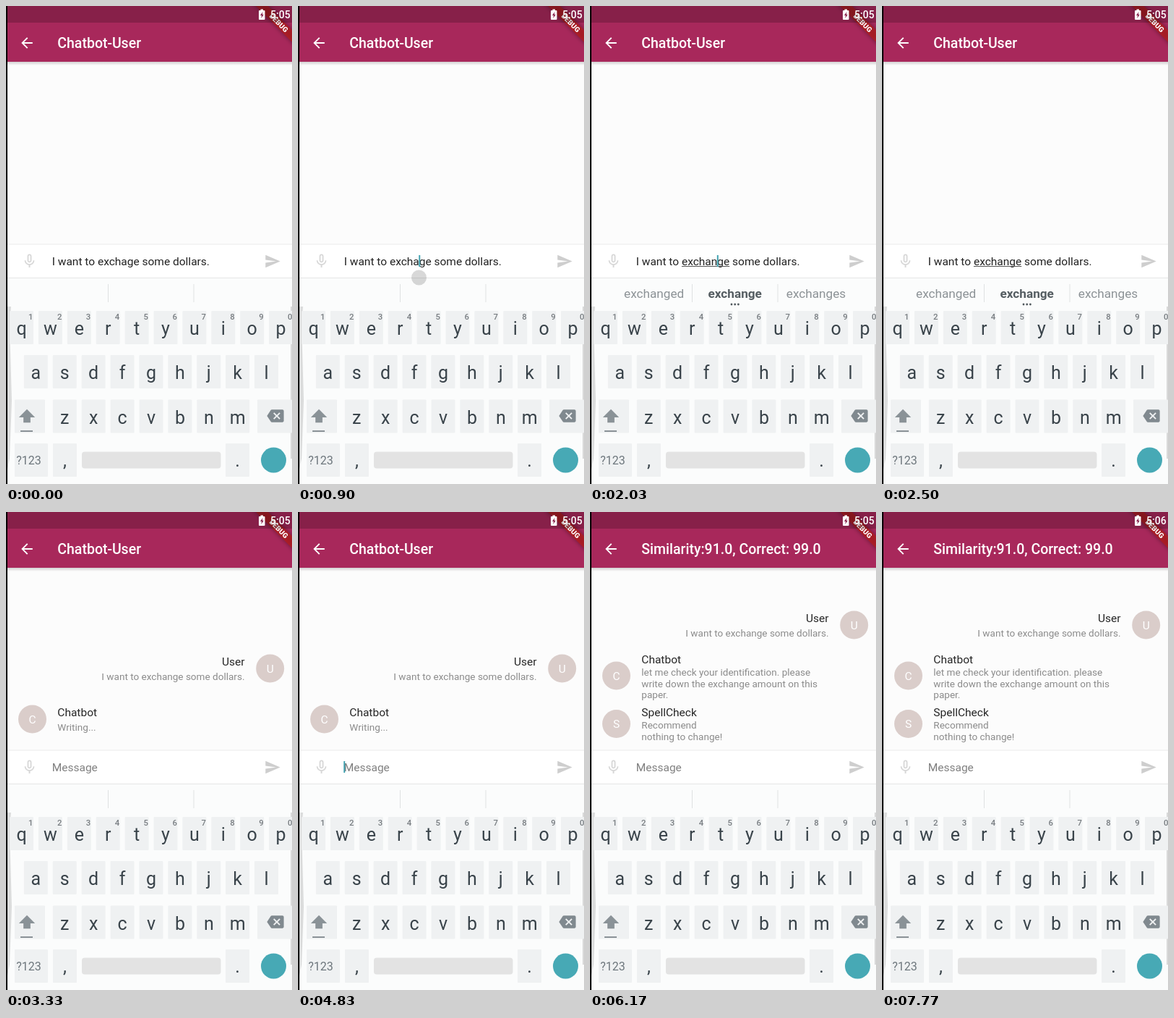
Animation of 396x660 px, one loop 8000 ms. Source, as an HTML page with a canvas:

```html
<!DOCTYPE html>
<html lang="en">
<head>
<meta charset="utf-8">
<title>Chat</title>
<style>
  html, body { margin: 0; width: 100%; height: 100%; overflow: hidden; background: #fcfcfc; }
  canvas { display: block; width: 396px; height: 660px; }
</style>
</head>
<body>
<canvas id="stage"></canvas>
<script>
const LOOP = 8000, RIGHT = 401; // the phone screen runs a little past the stage
const stage = document.getElementById('stage');
const ctx = stage.getContext('2d');
const dpr = window.devicePixelRatio || 1;
stage.width = 396 * dpr;
stage.height = 660 * dpr;

const ICONS = {
  back: 'M20 11H7.83l5.59-5.59L12 4l-8 8 8 8 1.41-1.41L7.83 13H20v-2z',
  mic: 'M12 14c1.66 0 2.99-1.34 2.99-3L15 5c0-1.66-1.34-3-3-3S9 3.34 9 5v6c0 1.66 1.34 3 3 3zm-1.2-9.1c0-.66.54-1.2 1.2-1.2s1.2.54 1.2 1.2l-.01 6.2c0 .66-.53 1.2-1.19 1.2s-1.2-.54-1.2-1.2V4.9zm6.5 6.1c0 3-2.54 5.1-5.3 5.1S6.7 14 6.7 11H5c0 3.41 2.72 6.23 6 6.72V21h2v-3.28c3.28-.48 6-3.3 6-6.72h-1.7z',
  send: 'M2.01 21L23 12 2.01 3 2 10l15 2-15 2z',
  erase: 'M22 3H7c-.69 0-1.23.35-1.59.88L0 12l5.41 8.11c.36.53.9.89 1.59.89h15c1.1 0 2-.9 2-2V5c0-1.1-.9-2-2-2zm-3 12.59L17.59 17 14 13.41 10.41 17 9 15.59 12.59 12 9 8.41 10.41 7 14 10.59 17.59 7 19 8.41 15.41 12 19 15.59z',
  shift: 'M12 1.5L23.5 13H17v7.5H7V13H.5z'
};

const ease = (t, from, to) => {
  const p = Math.min(1, Math.max(0, (t - from) / (to - from)));
  return 1 - (1 - p) ** 3;
};

function font(size, weight = 400) {
  ctx.font = `${weight} ${size}px Roboto, sans-serif`;
}

function text(str, x, y, size, color, align = 'left', weight = 400) {
  font(size, weight);
  ctx.fillStyle = color;
  ctx.textAlign = align;
  ctx.fillText(str, x, y);
}

function box(x, y, w, h, color, radius = 0) {
  ctx.fillStyle = color;
  ctx.beginPath();
  ctx.roundRect(x, y, w, h, radius);
  ctx.fill();
}

function dot(x, y, r, color) {
  ctx.fillStyle = color;
  ctx.beginPath();
  ctx.arc(x, y, r, 0, 7);
  ctx.fill();
}

function shape(points, color) {
  ctx.fillStyle = color;
  ctx.beginPath();
  points.forEach(([x, y]) => ctx.lineTo(x, y));
  ctx.fill();
}

function icon(name, x, y, color) {
  ctx.save();
  ctx.translate(x, y);
  ctx.scale(.97, .97);
  ctx.translate(-12, -12);
  ctx.fillStyle = color;
  ctx.fill(new Path2D(ICONS[name]), 'evenodd');
  ctx.restore();
}

function header(t) {
  const shadow = ctx.createLinearGradient(0, 77, 0, 82);
  shadow.addColorStop(0, '#d2cfd0');
  shadow.addColorStop(1, '#fcfcfc');
  box(0, 77, 396, 5, shadow);
  box(0, 0, 396, 77, '#a8285b');
  icon('back', 29, 51, '#fff');
  text(t < 4930 ? 'Chatbot-User' : 'Similarity:91.0, Correct: 99.0', 71.3, 57.5, 19.5, '#fff', 'left', 500);

  ctx.save();
  ctx.translate(RIGHT, 0);
  ctx.rotate(Math.PI / 4);
  ctx.shadowColor = 'rgba(0,0,0,.5)';
  ctx.shadowBlur = 6 * dpr;
  box(-60, 27, 120, 11.8, 'rgba(183,28,28,.75)');
  ctx.shadowBlur = 0;
  text('DEBUG', 0, 36.4, 9.9, '#fff', 'center', 900);
  ctx.restore();

  box(0, 0, 396, 23, 'rgba(0,0,0,.2)');
  box(350, 6, 8.5, 13, '#fff', 1);
  box(352.5, 4.5, 3.5, 2, '#fff');
  shape([[355.5, 8], [352, 13], [354, 13], [353.3, 17], [356.8, 11.8], [354.8, 11.8]], '#862049');
  text(t < 7170 ? '5:05' : '5:06', 366, 17, 14, '#fff', 'left', 500);
}

function messages(t) {
  const sent = ease(t, 2790, 3090), pending = ease(t, 2840, 3140), checked = ease(t, 4880, 4970);
  const replied = t >= 4930;
  const rows = [
    { name: 'SpellCheck', lines: ['Recommend', 'nothing to change!'],
      h: 59, grow: replied ? checked : 0, avatar: 30.5, nameY: 20, lineY: 37 },
    replied
      ? { name: 'Chatbot', lines: ['let me check your identification. please', 'write down the exchange amount on this', 'paper.'],
          h: 71, grow: 1, avatar: 35, nameY: 18, lineY: 35 }
      : { name: 'Chatbot', lines: ['Writing...'], h: 70, grow: pending, avatar: 35, nameY: 31, lineY: 50.5 },
    { name: 'User', lines: ['I want to exchange some dollars.'], mine: true,
      h: 70, grow: sent, avatar: 35, nameY: 31, lineY: 50.5 }
  ];
  let bottom = 321;
  for (const row of rows) {
    const shown = row.h * row.grow, align = row.mine ? 'right' : 'left';
    const x = row.mine ? 330.5 : 71.3, avatarX = row.mine ? 365.7 : 36.5;
    bottom -= shown;
    if (!shown) continue;
    ctx.save();
    ctx.beginPath();
    ctx.rect(0, bottom, 396, shown);
    ctx.clip();
    ctx.translate(0, bottom + (shown - row.h) / 2);
    dot(avatarX, row.avatar, 19.5, '#dacdca');
    text(row.name[0], avatarX, row.avatar + 5.5, 15.5, '#fff', 'center');
    text(row.name, x, row.nameY, 15.5, '#262626', align);
    row.lines.forEach((line, i) => text(line, x, row.lineY + i * 15.5, 13.55, '#8b8b8b', align));
    ctx.restore();
  }
}

// Times at which the caret turns on and off.
const BLINKS = [[70, 500], [770, 1770], [2030, 2500], [3400, 3730], [4100, 4530],
  [4800, 5400], [5770, 6170], [6600, 6970], [7400, 7770]];

function composer(t) {
  box(0, 329, 396, 46, '#fff');
  box(0, 328.5, 396, 1, '#ececec');
  box(0, 375, 396, 1, '#e6e6e6');
  icon('mic', 32.5, 352.3, '#d6d6d6');
  icon('send', 369, 352.5, '#cecece');

  const left = 63.7, base = 357.5, fixed = t >= 2030;
  const word = fixed ? 'exchange' : 'exchage';
  const width = str => ctx.measureText(str).width;
  let caret = left;
  if (t < 2800) {
    const line = `I want to ${word} some dollars.`;
    text(line, left, base, 15.5, '#222');
    const start = left + width('I want to ');
    if (t >= 1100) box(start, 359, width(word), 1, '#555');
    caret = t < 770 ? left + width(line) + 1 : start + width(fixed ? 'exchan' : 'excha');
  } else {
    text('Message', left, base, 15.5, '#808080');
  }
  if (BLINKS.some(([on, off]) => t >= on && t < off)) box(caret - .5, 344, 2, 16, '#43a3b1');
}

function suggestions(t) {
  box(0, 376, 396, 284, '#fbfcfc');
  for (const x of [141, 259.5]) box(x, 384, 1, 25, '#dfe1e2');
  if (t < 1100 || t >= 2800) return;
  const fixed = t >= 2030;
  const words = fixed ? ['exchanged', 'exchange', 'exchanges'] : ['exchange', 'exchage', 'exchanged'];
  words.forEach((word, i) => {
    const main = i === 1;
    text(word, [88.7, 200.7, 313][i], 403, 17.2, main ? '#555d62' : '#8c9296',
      'center', main ? (fixed ? 700 : 500) : 400);
  });
  for (const x of [196, 200.7, 205.4]) dot(x, 412, 1.4, '#50585d');
}

function keyboard() {
  const key = (x, y, w = 33) => box(x, y, w, 46, '#eff1f2', 1);
  shape([[2, 415], [7, 415], [5, 440], [8, 545], [5, 625], [2, 640]], '#dcdddd');
  box(394, 415, 2, 210, '#dadada');
  [['qwertyuiop', 21.5, 421], ['asdfghjkl', 41.3, 482], ['zxcvbnm', 81.3, 543.5]].forEach(([letters, x0, y], row) => {
    [...letters].forEach((letter, i) => {
      const x = x0 + i * 39.9;
      key(x - 16.5, y);
      text(letter, x, y + 33, 25, '#39434a', 'center');
      if (row === 0) text((i + 1) % 10, x + 12.7, y + 11.5, 11.3, '#777c80', 'center', 500);
    });
  });
  key(12, 543.5, 42);
  icon('shift', 29, 567, '#8a9297');
  box(20, 586, 17, 2, '#8a9297');
  key(348, 543.5, 48);
  icon('erase', 373, 566, '#80898f');
  key(12, 604, 46);
  text('?123', 31.5, 633, 16, '#6d767c', 'center');
  key(65, 604);
  text(',', 81.5, 636, 25, '#39434a', 'center');
  box(105, 615.5, 192.5, 23, '#e3e3e3', 4);
  key(304, 604);
  text('.', 320.5, 636, 25, '#39434a', 'center');
  dot(370.5, 627, 17.5, '#47a9b5');
}

function touch(t) {
  if (t < 770 || t >= 1470) return;
  const alpha = .2 * Math.min(1, (1470 - t) / 150);
  dot(167.5, 375, 10.5, `rgba(60,60,60,${alpha})`);
}

function draw(now) {
  const t = now % LOOP;
  ctx.setTransform(dpr, 0, 0, dpr, 0, 0);
  box(0, 0, 396, 660, '#fcfcfc');
  messages(t);
  header(t);
  composer(t);
  suggestions(t);
  keyboard();
  touch(t);
  box(0, 0, 2, 660, '#000');
}

const begin = performance.now();
function tick() {
  draw(performance.now() - begin);
  requestAnimationFrame(tick);
}
tick();
</script>
</body>
</html>
```
